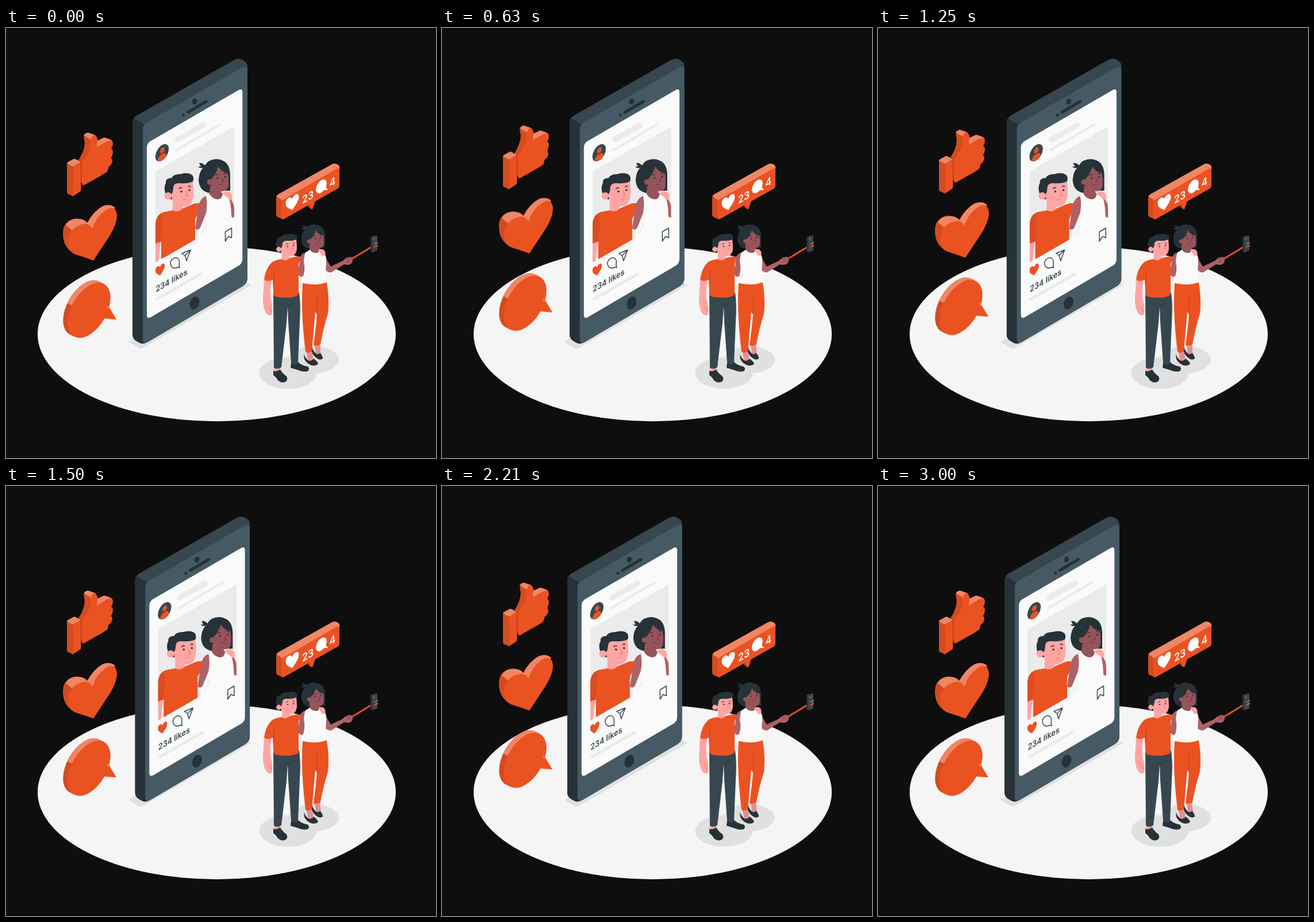
An HTML page without scripts that plays this animation: 748x748 px, repeating every 3040 ms.

```html
<!DOCTYPE html>
<html lang="en">
<head>
<meta charset="utf-8">
<title>Sharing a selfie</title>
<style>
html, body { margin: 0; width: 100%; height: 100%; overflow: hidden; background: #0e0e0e; }
svg { display: block; width: 100vw; height: 100vh; }
text { font-family: Inter, "Open Sans", sans-serif; font-weight: 600; }
.or { fill: #eb5222; }
.sh { fill: #d54b20; }
.li { fill: #f18665; }
.dk { fill: #263238; }
.md { fill: #37474f; }
.gr { fill: #ebebeb; }
.wh { fill: #fafafa; }
.pk { fill: #ffa5a4; }
.br { fill: #96535a; }
.b2 { fill: #ac6266; }
.ln { fill: none; stroke: #37474f; stroke-width: 1.5; stroke-linejoin: round; stroke-linecap: round; }
.bar { stroke: #ebebeb; stroke-linecap: round; }
.thin { fill: none; stroke: #263238; stroke-linecap: round; }
.float { animation: float 3.04s linear infinite; }
.phone { animation: drift 3.04s linear infinite; }
@keyframes float {
  0%, 49.34%, 98.68%, 100% { transform: translateY(0); }
  24.67%, 74.01% { transform: translateY(-14.6px); }
}
@keyframes drift {
  0%, 98.68%, 100% { transform: translateX(0); }
  59.21% { transform: translateX(5.2px); }
  74.01% { transform: translateX(-2.9px); }
  88.82% { transform: translateX(.8px); }
}
</style>
</head>
<body>
<svg viewBox="0 0 748 748">
<defs>
  <clipPath id="photo"><path d="M260 249L397 171V329L260 408Z"/></clipPath>
  <path id="heart" d="M0 9C-4 5-9 2-9-4C-9-10-2-11 0-5C2-11 9-10 9-4C9 2 4 5 0 9Z"/>
</defs>
<rect width="748" height="748" fill="#0e0e0e"/>
<ellipse cx="366.500" cy="532.500" rx="311.500" ry="151.700" fill="#f5f5f5"/>
<g fill="#e0e0e0">
  <path d="M213 546L230 535L415 441L427 447L239 556Q234 559 229 556Z"/>
  <ellipse cx="490.500" cy="600" rx="50" ry="27.500"/>
  <ellipse cx="535" cy="577" rx="44" ry="23.500"/>
</g>

<g class="phone">
  <path class="md" d="M220 165Q220 156 228 152L396 56Q404 51 411 55Q420 59 420 67V435Q420 444 412 449L247 546Q240 550 233 548L226 544Q220 540 220 532Z"/>
  <path class="dk" d="M220 165Q220 160 222 157L240 167Q238 171 238 177V539Q238 547 243 548Q238 550 233 548L226 544Q220 540 220 532Z"/>
  <path fill="#455a64" d="M238 178Q238 169 246 164L410 69Q420 64 420 75V435Q420 444 412 449L247 546Q238 551 238 541Z"/>
  <g class="dk">
    <ellipse cx="328" cy="128" rx="4.300" ry="5.400" transform="rotate(20 328 128)"/>
    <circle cx="308.500" cy="151.500" r="2.600"/>
    <ellipse cx="328" cy="478.500" rx="8" ry="11.500" transform="rotate(20 328 478.500)"/>
  </g>
  <path class="thin" d="M316.500 146.500L348 128" stroke-width="5.500"/>
  <path class="wh" d="M245 208Q245 201 251 197L404.500 108Q411.300 104 411.300 112V402Q411.300 409 405.500 413L252 503Q245 507 245 499Z"/>

  <g class="bar">
    <path d="M298.500 194L342 169.500" stroke-width="10"/>
    <path d="M296 212.500L372 168" stroke-width="4"/>
    <path d="M262.500 471.500L338 428.500" stroke-width="5"/>
  </g>
  <g transform="matrix(.866 -.5 0 1 271.500 217)">
    <circle r="13.500" class="md"/>
    <circle cx=".5" cy="-4" r="4.600" class="or"/>
    <path class="or" d="M-9 9.500Q-8 2 0 2Q8 2 9 9.500Q0 17 -9 9.500Z"/>
  </g>

  <g clip-path="url(#photo)">
    <path class="gr" d="M260 249L397 171V329L260 408Z"/>
    <path class="pk" d="M260 366L270 368L267 386L265 408H260Z"/>
    <path class="or" d="M260 342Q261 324 275 320L291 317Q299 321 307 314L326 306Q336 303 341 307L334 322L329 332V371L270 405V371L260 375Z"/>
    <path d="M260 342Q261 328 270 322Q274 334 272 348L270 371L260 375Z" fill="#dc4c20"/>
    <!-- man -->
    <path class="pk" d="M290 299L307 309V314Q299 322 290 317Z"/>
    <path class="dk" d="M277 287Q274 276 278 270Q277 261 288 261Q291 254 304 254Q318 250 325 257Q328 264 323 271L292 275L289 298Q281 299 277 287Z"/>
    <circle class="pk" cx="282" cy="292" r="6.300"/>
    <path class="pk" d="M287 290Q291 286 291 277Q292 269 302 270Q316 271 325 267Q327 280 326 291Q325 307 313 310Q298 312 290 301Z"/>
    <g class="dk"><circle cx="305" cy="284.500" r="1.700"/><circle cx="319" cy="282" r="1.700"/></g>
    <path class="thin" d="M301 279.500Q303 277 306 278M317 276Q319 274 321 276" stroke-width="1.400"/>
    <path d="M313 283L316 291L312 292M308 299Q311 297 314 299" fill="none" stroke="#e77678" stroke-width="1.100"/>
    <!-- woman -->
    <path class="dk" d="M343 243Q338 245 334 241L339 241L336 235Q341 234 346 239Q352 228 367 228Q389 230 390 254V283H372L354 287Q336 284 335 264Q336 250 343 243Z"/>
    <path class="wh" d="M344 295L356 287L379 288L389 296Q394 314 397 331L333 368Q339 335 344 295Z"/>
    <path class="br" d="M355 274L373 283L377 289Q375 299 367 298Q358 296 354 289Z"/>
    <path class="b2" d="M348 292Q338 296 335 309L329 349Q335 353 338 347L348 322Q351 306 348 292Z"/>
    <path class="b2" d="M388 296Q396 300 397 314V331L392 328Q392 310 388 296Z"/>
    <path class="br" d="M356 264Q366 254 369 241Q375 250 386 253Q388 264 387 275Q385 284 376 284Q363 284 357 276Z"/>
    <circle class="br" cx="354.500" cy="268" r="4.800"/>
    <path class="pk" d="M376 288Q383 281 390 286Q395 291 393 299Q388 299 384 294Z"/>
    <g class="dk"><circle cx="368" cy="261" r="1.600"/><circle cx="381" cy="259" r="1.600"/></g>
    <path class="thin" d="M364 256.500Q366 254 369 255M379 253.500Q381 252 383 254" stroke-width="1.200"/>
    <path d="M376 261L379 267L375 268M370 273Q373 271 376 273" fill="none" stroke="#6f343d" stroke-width="1.100"/>
    <path d="M338 358Q347 351 349 339" fill="none" stroke="#e0e0e0" stroke-width="1.200"/>
  </g>

  <use href="#heart" class="or" transform="matrix(.9 -.48 0 1 268 421.500)"/>
  <g class="ln">
    <path d="M299 416Q292 420 288 415Q284 409 288 404Q293 398 298 400Q303 404 301 411L302 417Z"/>
    <path d="M306 392L321 386L314 405L311.500 396ZM311.500 396L321 386"/>
    <path d="M381.500 354.500L392.500 348V365L387 362.500L381.500 371Z"/>
  </g>
  <text class="md" font-size="14.500" transform="matrix(.866 -.5 0 1 260.500 460)">234 likes</text>
</g>

<g class="float">
  <!-- thumb -->
  <path class="sh" d="M106 236L118 240V292Q116 294 113 291L108 289Q106 288 106 285Z"/>
  <path class="or" d="M117 241L130.500 233V282Q130 284 128 285L119 291Q117 293 117 290Z"/>
  <path class="li" d="M106 236Q106 234 108 233L117 228Q119 227 121 228L130.500 233L117 241Z"/>
  <path class="sh" d="M126 230Q136 215 137 200L135 188L149 192L148 215L134 272L130.500 268V233Z"/>
  <path class="or" d="M132 271V237Q132 234 134 231Q147 216 147 200Q147 187 155 186Q161 191 159 203L158 208L177 197Q186 193 186 201Q186 206 183 210Q188 213 185 221Q184 224 183 226Q187 231 183 237Q181 240 178 242Q179 249 170 254L140 271Q132 276 132 271Z"/>
  <path class="li" d="M135 187Q138 182 143 182L155 186Q149 187 148 194Z"/>
  <path class="li" d="M159 196L169 191Q172 190 176 192Q184 194 185 198Q182 195 177 197L158 208Z"/>
  <!-- heart -->
  <path class="sh" d="M99 357Q99 337 118 332Q134 330 141 339Q152 319 168 310Q182 305 190 313L170 350L152 404L118 392Q99 382 99 357Z"/>
  <path class="li" d="M104 343Q109 334 119 332Q134 330 142 339Q152 319 168 310Q182 305 190 313L172 325L150 350L125 347L115 352Z"/>
  <path class="or" d="M152 404.500Q138 399 121 394Q108 389 108 373Q109 352 125 344Q144 335 150 349Q157 328 173 317Q191 306 193 326Q193 344 174 371Z"/>
  <!-- bubble -->
  <g transform="matrix(.866 -.5 0 1 144.500 491)">
    <path class="sh" d="M-38.700 22.600A43 43 0 0 1 20.300 -40L29.500 -31.300L-29.500 31.300Z"/>
    <path class="li" d="M-43.800 -34.200A43 43 0 0 1 20.300 -40L29.500 -31.300L-34.600 -25.600Z"/>
    <circle class="or" r="43"/>
  </g>
  <path class="li" d="M175 483L180 486L192 507L181 498Z"/>
  <path class="or" d="M179 486L192 507L168 505Z"/>
</g>

<!-- notification -->
<path class="or" d="M524 304L531 315Q533 316 534 313L539 297Z"/>
<path class="sh" d="M524 305L526 311L532 316Z"/>
<path class="sh" d="M470 295Q470 291 474 289L482 297V333L473 329Q470 328 470 324Z"/>
<path class="li" d="M471 293Q471 291 474 289L567 237Q571 235 574 236L578 238Q581 240 580 246L482 301Z"/>
<path class="or" d="M479 304Q479 300 483 298L575 245Q580 242 580 247V274Q580 278 576 280L484 332Q479 334 479 329Z"/>
<use href="#heart" fill="#fff" transform="matrix(1.270 -.65 0 1.350 498 304.500)"/>
<g fill="#fff" font-size="18.500">
  <text transform="matrix(.866 -.5 0 1 515 306.500)">23</text>
  <text transform="matrix(.866 -.5 0 1 562.500 277.500)">4</text>
  <circle r="10.800" transform="matrix(.866 -.5 0 1 548.500 275.500)"/>
  <path d="M556 276L560 282L552 282Z"/>
</g>

<!-- woman standing -->
<g fill="#e58f8f">
  <path d="M522 562L532 559L535 579L526 579Z"/>
  <path d="M537 550L546 548L548 569L539 567Z"/>
</g>
<path class="dk" d="M518 567Q521 575 527 579Q533 579 535 575Q541 579 543 584Q540 588 532 587Q523 584 519 576Z"/>
<path class="dk" d="M532 555Q535 563 540 567Q545 568 546 565Q551 570 551 575Q548 578 543 576Q534 571 532 563Z"/>
<path class="or" d="M516 444L558 442Q563 474 560 497Q552 522 547 550Q541 554 535 552Q539 522 541 499L538 494L532 562Q526 567 521 563Q514 505 515 463Z"/>
<path d="M541 464Q543 484 539 494" fill="none" stroke="#c9431c" stroke-width="1"/>
<path d="M600 402.500L638 379.500" stroke="#eb5222" stroke-width="2.800"/>
<path class="md" d="M634 366Q634 364 636 363L643 361Q646 360 646 363V385Q646 387 644 388L637 390Q634 390 634 387Z"/>
<path class="dk" d="M634 366L637 365V390Q634 390 634 387Z"/>
<path d="M641 376L647 373M641 381L647 378" stroke="#eb5222" stroke-width="2"/>
<circle cx="640" cy="367" r="1" fill="#8c9ba2"/>
<path class="b2" d="M549 388Q556 391 558 403L565 415L586 405Q590 399 600 398Q605 402 602 408Q598 414 588 411L566 425Q559 426 554 419L547 404Z"/>
<path d="M590 403L600 401M592 407L601 405" stroke="#843f48" stroke-width="1"/>
<path class="b2" d="M519 391Q512 393 511 405L508 425Q509 435 517 432L523 406Z"/>
<path class="wh" d="M520 391L531 384L546 384L552 388Q558 397 557 410Q555 426 559 442Q537 450 514 443Q522 425 518 405Z"/>
<path d="M519 438Q522 426 531 429" fill="none" stroke="#e5e5e5"/>
<path class="dk" d="M520 350Q516 352 513 349L517 348L514 344Q519 342 523 346Q529 341 538 342Q554 344 555 360V382H542L527 384Q514 381 514 367Q514 356 520 350Z"/>
<path class="br" d="M528 374L544 381L546 386Q543 393 537 391Q530 390 528 384Z"/>
<path class="br" d="M529 368Q537 361 539 352Q543 359 552 361Q554 373 552 379Q549 384 541 383Q534 383 529 377Z"/>
<circle class="br" cx="527.500" cy="371" r="3.600"/>
<g class="dk"><circle cx="538" cy="366" r="1.200"/><circle cx="547.500" cy="364.500" r="1.200"/></g>
<path class="thin" d="M535 362L538 361M546 360L549 361" stroke-width=".9"/>
<path d="M544 366L546 371L543 371M539 376L543 375" fill="none" stroke="#6f343d" stroke-width=".9"/>
<path class="pk" d="M543 387Q550 382 554 387Q557 392 554 396Q550 398 548 393Z"/>

<!-- man standing -->
<g class="pk">
  <path d="M466 586H477V603H467Z"/>
  <path d="M497 579H507L508 590H497Z"/>
  <path d="M449 437L462 438Q459 453 460 469Q465 488 463 498Q459 503 453 497Q447 487 447 472Z"/>
</g>
<path d="M456 484Q460 487 461 494" fill="none" stroke="#e77678"/>
<path class="dk" d="M465 596Q470 599 477 594Q480 600 488 606Q491 611 487 615Q480 619 473 613Q469 606 465 604Z"/>
<path class="dk" d="M496 582Q501 586 508 581Q514 587 525 589Q529 593 525 597Q516 599 508 595L495 591Z"/>
<path class="md" d="M465 464L510 460Q513 482 511 510L508 583Q502 588 496 583L491 511L490 484L488 513L479 590Q473 595 466 591Z"/>
<path d="M490 486Q494 481 501 478" class="thin" stroke-width="1"/>
<path class="or" d="M463 407Q470 403 479 402L493 400L508 397Q513 398 512 403L509 410V463Q504 470 484 469Q468 469 465 464V437Q454 443 449 437Q452 417 463 407Z"/>
<path class="sh" d="M464 438Q466 426 466 414Q469 428 467 444L465 455Z"/>
<path class="pk" d="M480 390L493 397V401Q486 407 480 402Z"/>
<path class="dk" d="M471 382Q468 375 471 370Q470 364 477 364Q480 359 490 359Q501 356 506 361Q508 367 503 371L483 373L480 391Q473 389 471 382Z"/>
<circle class="pk" cx="474.500" cy="385" r="4.400"/>
<path class="pk" d="M478 384Q481 380 481 374Q483 370 488 370Q498 371 505 368Q506 376 506 385Q504 396 496 397Q485 398 479 391Z"/>
<g class="dk"><circle cx="490" cy="380" r="1.200"/><circle cx="500" cy="378.500" r="1.200"/></g>
<path class="thin" d="M487 376L491 375M499 374L502 375" stroke-width="1"/>
<path d="M496 380L499 385L496 386M492 391L496 390" fill="none" stroke="#e77678" stroke-width=".9"/>
</svg>
</body>
</html>
```
